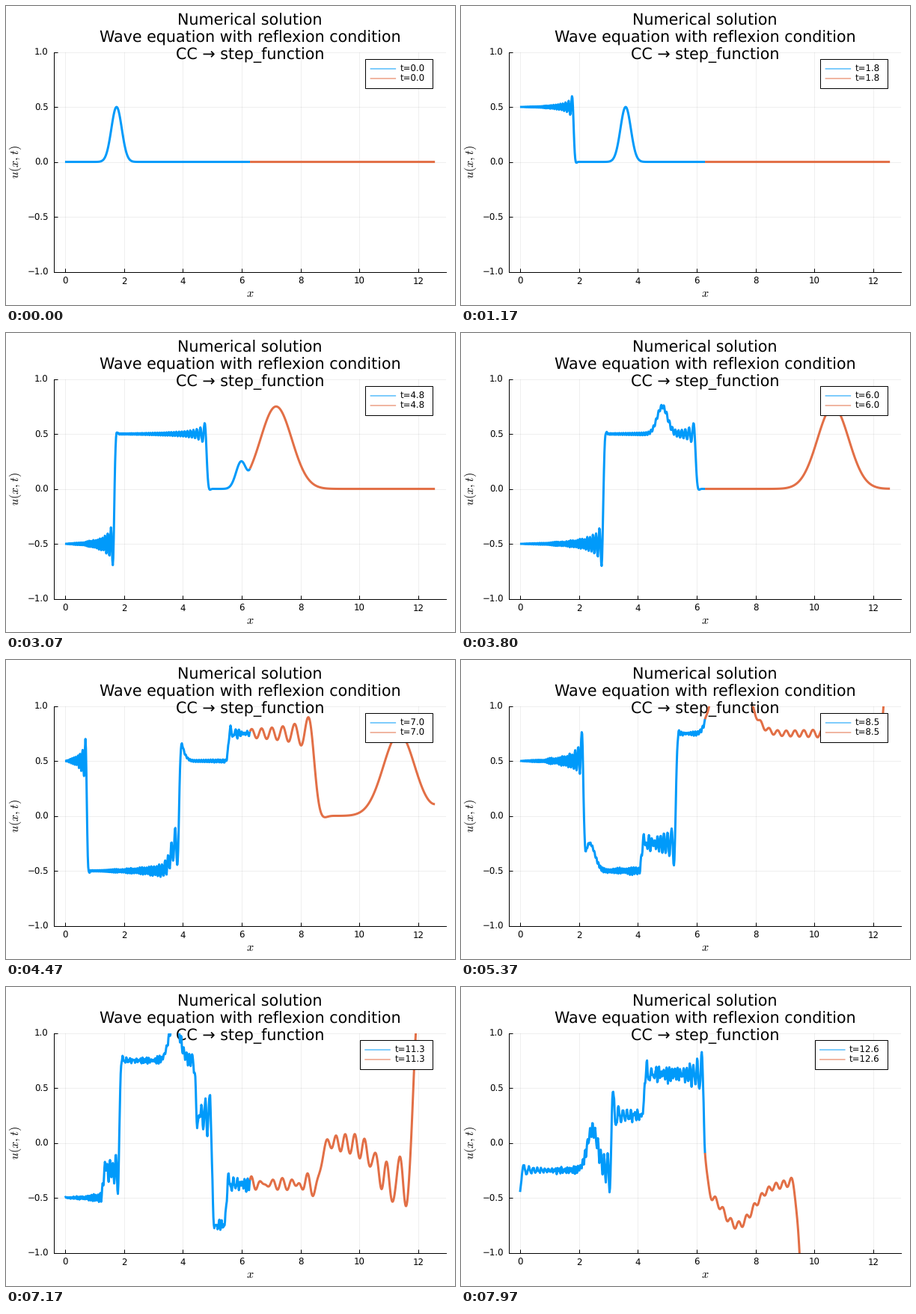
A matplotlib script for the animation above (8 s loop, 600x400 px).

```python
import numpy as np
import matplotlib.pyplot as plt
from matplotlib.animation import FuncAnimation
from matplotlib.patches import Rectangle
from matplotlib.textpath import TextPath

W, H, DPI = 600, 400, 100
FRAMES, STEPS = 240, 10
BLUE, RED = "#009AFA", "#E26F46"
SMALL, LABEL, TITLE = 8.5, 11.7, 14.88

plt.rcParams.update({
    "font.family": "DejaVu Sans",
    "mathtext.fontset": "cm",
    "text.hinting": "no_hinting",
    "path.simplify": False,
})


def pt(px):
    return px * 72 / DPI


# --- two coupled domains, u = r + l, wave speeds 1 and 3 ---
N = 400
L = 2 * np.pi
dx = L / (N - 1)
dt = dx / 3
x = np.linspace(0, L, N)
speed = np.array([[-1.0], [1.0], [-3.0], [3.0]])
sat = 48 / 17 / dx


def derivative():
    """Fourth-order summation-by-parts first derivative."""
    d = np.zeros((N, N))
    for offset, c in ((-2, 1), (-1, -8), (1, 8), (2, -1)):
        d += np.diag(np.full(N - abs(offset), c / 12), offset)
    edge = np.array([
        [-24 / 17, 59 / 34, -4 / 17, -3 / 34, 0, 0],
        [-1 / 2, 0, 1 / 2, 0, 0, 0],
        [4 / 43, -59 / 86, 0, 59 / 86, -4 / 43, 0],
        [3 / 98, 0, -59 / 98, 0, 32 / 49, -4 / 49],
    ])
    d[:4], d[-4:] = 0, 0
    d[:4, :6] = edge
    d[-4:, -6:] = -edge[::-1, ::-1]
    return d / dx


DT = derivative().T.copy()


def step_function(t):
    return 0.5 if t % (2 * np.pi) < np.pi else -0.5


def rhs(t, y):
    r1, l1, r2, l2 = y
    dy = speed * (y @ DT)
    # incoming waves: driven end, interface (both sides), free end
    dy[0, 0] -= sat * (r1[0] - step_function(t))
    dy[1, -1] -= sat * (l1[-1] - 0.5 * r1[-1] - 0.5 * l2[0])
    dy[2, 0] -= 3 * sat * (r2[0] - 1.5 * r1[-1] + 0.5 * l2[0])
    dy[3, -1] -= 3 * sat * (l2[-1] - r2[-1])
    return dy


def solve():
    y = np.zeros((4, N))
    y[0] = 0.5 * np.exp(-16 * (x - 1.75) ** 2)
    out = []
    for i in range(FRAMES * STEPS):
        if i % STEPS == 0:
            out.append((y[0] + y[1], y[2] + y[3]))
        t = i * dt
        k1 = rhs(t, y)
        k2 = rhs(t + dt / 2, y + dt / 2 * k1)
        k3 = rhs(t + dt / 2, y + dt / 2 * k2)
        k4 = rhs(t + dt, y + dt * k3)
        y = y + dt / 6 * (k1 + 2 * k2 + 2 * k3 + k4)
    return out


waves = solve()

# --- stage ---
fig = plt.figure(figsize=(W / DPI, H / DPI), dpi=DPI, facecolor="white")


def layer(z):
    a = fig.add_axes([0, 0, 1, 1], zorder=z)
    a.set_xlim(0, W)
    a.set_ylim(H, 0)
    a.axis("off")
    return a


back, front = layer(0), layer(2)

X0, X1, Y0, Y1 = 64.1, 588, 61.55, 355.55
ax = fig.add_axes([X0 / W, 1 - Y1 / H, (X1 - X0) / W, (Y1 - Y0) / H], zorder=1)
ax.patch.set_visible(False)
ax.set_xlim(-0.03 * 2 * L, 1.03 * 2 * L)
ax.set_ylim(-1, 1)
ax.set_xticks(range(0, 13, 2))
ax.set_yticks(np.arange(-1, 1.1, 0.5))
ax.tick_params(direction="in", length=pt(5), width=pt(1), labelsize=SMALL)
ax.tick_params(axis="x", pad=pt(7.3))
ax.tick_params(axis="y", pad=pt(7.3))
ax.grid(color="black", alpha=0.1, lw=pt(0.6))
ax.set_axisbelow(True)
for side in ("top", "right"):
    ax.spines[side].set_visible(False)
for side in ("left", "bottom"):
    ax.spines[side].set_linewidth(pt(1))

titles = ("Numerical solution",
          "Wave equation with reflexion condition",
          "CC → step_function")
for i, s in enumerate(titles):
    back.text(326, 26 + 22.6 * i, s, size=TITLE, ha="center", va="baseline")
back.text(326, 384, "$x$", size=LABEL, ha="center", va="center")
back.text(12.5, 208.5, "$u(x,t)$", size=LABEL, ha="center", va="center",
          rotation=90)

curves = [ax.plot([], [], color=c, lw=pt(3), solid_capstyle="butt",
                  snap=False)[0] for c in (BLUE, RED)]

# --- legend, right edge fixed ---
RIGHT, TOP, BOTTOM = 570.4, 70.6, 109.6
box = front.add_patch(Rectangle((480, TOP), 90, BOTTOM - TOP, fc="white",
                                ec="black", lw=pt(1)))
keys, labels = [], []
for y, c in ((84, BLUE), (97, RED)):
    keys.append(front.plot([], [], color=c, lw=pt(1), snap=False,
                           solid_capstyle="butt")[0])
    labels.append(front.text(0, y + 4.2, "", size=SMALL, va="baseline"))


def draw(i):
    for k, (curve, u) in enumerate(zip(curves, waves[i])):
        curve.set_data(x + k * L, u)
    s = f"t={(i * STEPS + 1) * dt:.1f}"
    ink = TextPath((0, 0), s, size=SMALL * DPI / 72).get_extents().width
    left = RIGHT - 58.1 - ink
    box.set_x(left)
    box.set_width(RIGHT - left)
    for key, label, y in zip(keys, labels, (84, 97)):
        key.set_data([left + 6.5, left + 41], [y, y])
        label.set_x(left + 46.5)
        label.set_text(s)
    return curves + keys + labels + [box]


anim = FuncAnimation(fig, draw, frames=FRAMES, interval=8000 / FRAMES,
                     repeat=True, repeat_delay=0, blit=False)
plt.show()
```
